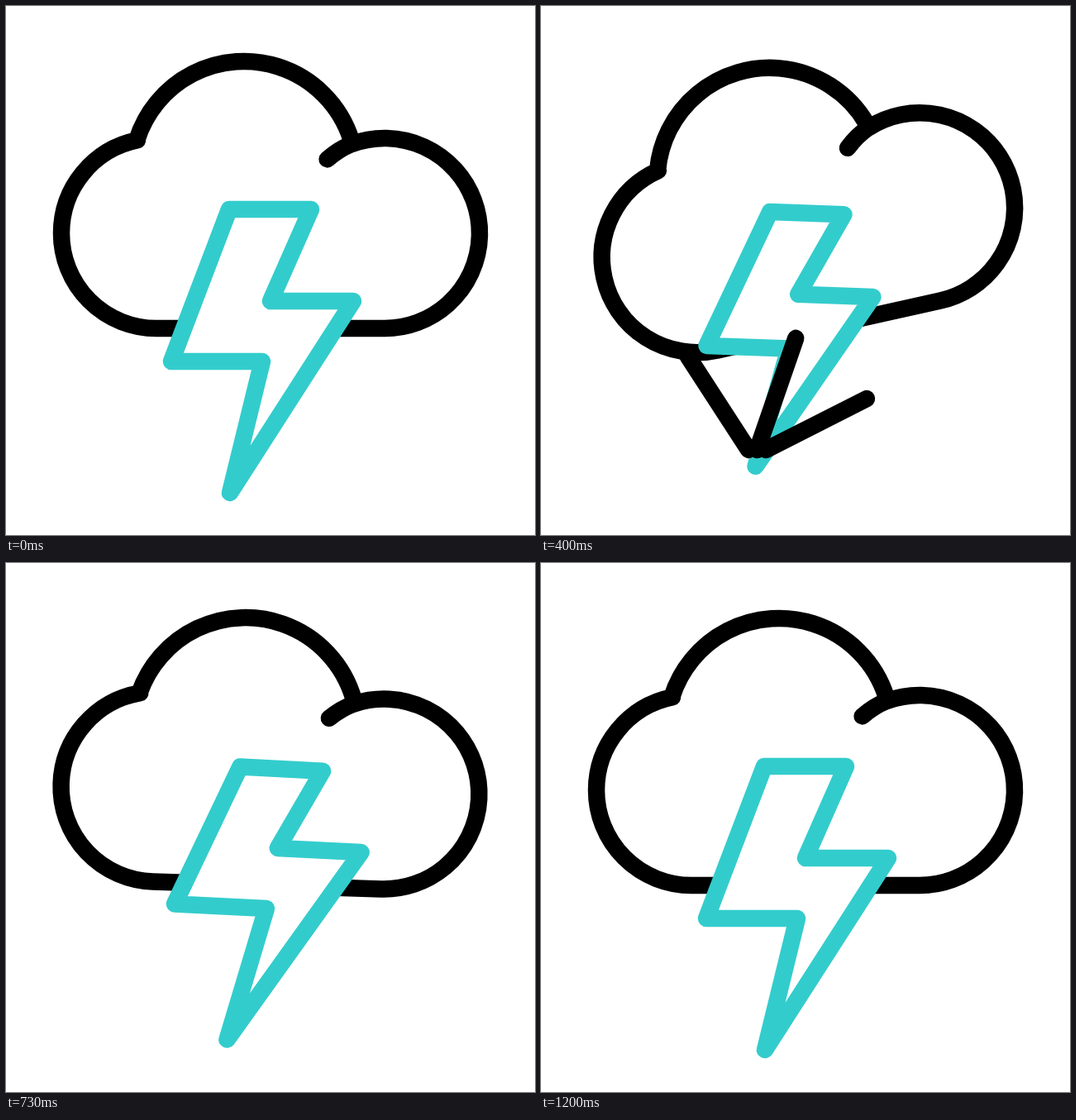
Write an HTML page with a canvas that moves like this. It is 640 by 640 pixels and loops after 1670 ms.

```html
<!DOCTYPE html>
<html>
<head>
<meta charset="utf-8">
<style>
html, body { margin: 0; width: 100%; height: 100%; overflow: hidden; background: #fff; }
canvas { display: block; width: 100vmin; height: 100vmin; }
</style>
</head>
<body>
<canvas width="640" height="640"></canvas>
<script>
const ctx = document.querySelector('canvas').getContext('2d');
const LOOP = 1670, LAST = 36, WEIGHT = 20.5, RAD = Math.PI / 180;

// All times below are in 1/30 s
const rest = { at: 0, x: 271, y: 589, turn: 0, scale: 1, dx: 0, dy: 0 };
const windUp = { at: 8, x: 210, y: 538, turn: 14, scale: .975, dx: -11.5, dy: 48 };
const strike = { at: 16, x: 293.5, y: 569.7, turn: -6.2, scale: .855, dx: 22, dy: -29.5 };
const rebound = { at: 22, x: 267.5, y: 576.5, turn: 2.9, scale: 1.01, dx: 0, dy: 16 };
const poses = [rest, windUp, strike, rebound, { ...rest, at: 25 }];

const swingPeaks = [0, -17.7, 7.5, -3.8, 2, 0];
const sparkStart = [217, 537];
const sparks = [
  { bend: [191, 398], end: [77, 301] },
  { bend: [351, 382], end: [351, 226] },
  { bend: [446, 482], end: [557, 353] }
];

const clamp = u => Math.max(0, Math.min(1, u));
const mix = (a, b, u) => a + (b - a) * u;
const mixPoint = (p, q, u) => [mix(p[0], q[0], u), mix(p[1], q[1], u)];
const smooth = u => u * u * (3 - 2 * u);
const snap = u => smooth(u ** .83);

function poseAt(t) {
  const i = Math.max(1, poses.findIndex(p => p.at > t));
  const from = poses[i - 1], to = poses[i];
  if (t >= poses[poses.length - 1].at) return rest;
  const u = snap((t - from.at) / (to.at - from.at));
  return Object.fromEntries(Object.keys(rest).map(key => [key, mix(from[key], to[key], u)]));
}

// The cloud is hit, then swings out with a half period of 6
function swing(t) {
  if (t < 13) return swingPeaks[1] * smooth(clamp((t - 10.2) / 2.8));
  const n = (t - 7) / 6, i = Math.floor(n);
  return mix(swingPeaks[i], swingPeaks[i + 1], smooth(n - i));
}

function cloud(t) {
  ctx.save();
  ctx.translate(318, 259);
  ctx.rotate(swing(t) * RAD);
  ctx.translate(-318, -259);
  ctx.beginPath();
  ctx.moveTo(388.6, 185.4);
  ctx.quadraticCurveTo(403, 173, 418, 167);
  ctx.arc(458, 275, 115, Math.atan2(-108, -40), Math.PI / 2);
  ctx.arc(182, 275, 115, Math.PI / 2, Math.atan2(-113, -23));
  ctx.arc(288, 203, 136, Math.atan2(-41, -129), Math.atan2(-41, 130));
  ctx.stroke();
  ctx.restore();
}

// Points are relative to the tip; only the top edge stretches
function bolt({ x, y, turn, scale, dx, dy }) {
  const points = [
    [dx - 1, dy - 343], [dx + 98, dy - 343], [49, -232], [149, -232],
    [0, 0], [39, -159], [-71, -159]
  ];
  ctx.save();
  ctx.translate(x, y);
  ctx.rotate(turn * RAD);
  ctx.scale(scale, scale);
  ctx.lineWidth = WEIGHT / scale;
  ctx.strokeStyle = '#33cccc';
  ctx.beginPath();
  points.forEach(p => ctx.lineTo(...p));
  ctx.closePath();
  ctx.fill();
  ctx.stroke();
  ctx.restore();
}

// Outer ends fly along curves, inner ends leave the bolt tip later
function drawSparks(t, tipX) {
  const out = clamp((t - 8) / 8) ** 1.2, follow = clamp((t - 12) / 9.6);
  if (out === 0 || follow === 1) return;
  ctx.beginPath();
  sparks.forEach(({ bend, end }, i) => {
    const spread = (i - 1) * 24 * out * (1 - follow);
    const outer = mixPoint(mixPoint(sparkStart, bend, out), mixPoint(bend, end, out), out);
    const inner = mixPoint([tipX + 2 + spread, sparkStart[1]], end, follow);
    ctx.moveTo(...inner);
    ctx.lineTo(...outer);
  });
  ctx.stroke();
}

function draw() {
  const ms = performance.now() % LOOP;
  const t = Math.min(LAST, Math.floor(ms * .03 + .11));
  const pose = poseAt(t);
  ctx.fillStyle = '#fff';
  ctx.fillRect(0, 0, 640, 640);
  ctx.strokeStyle = '#000';
  ctx.lineWidth = WEIGHT;
  ctx.lineCap = ctx.lineJoin = 'round';
  cloud(t === LAST ? 0 : t);
  bolt(pose);
  drawSparks(t, pose.x);
  requestAnimationFrame(draw);
}
draw();
</script>
</body>
</html>
```
